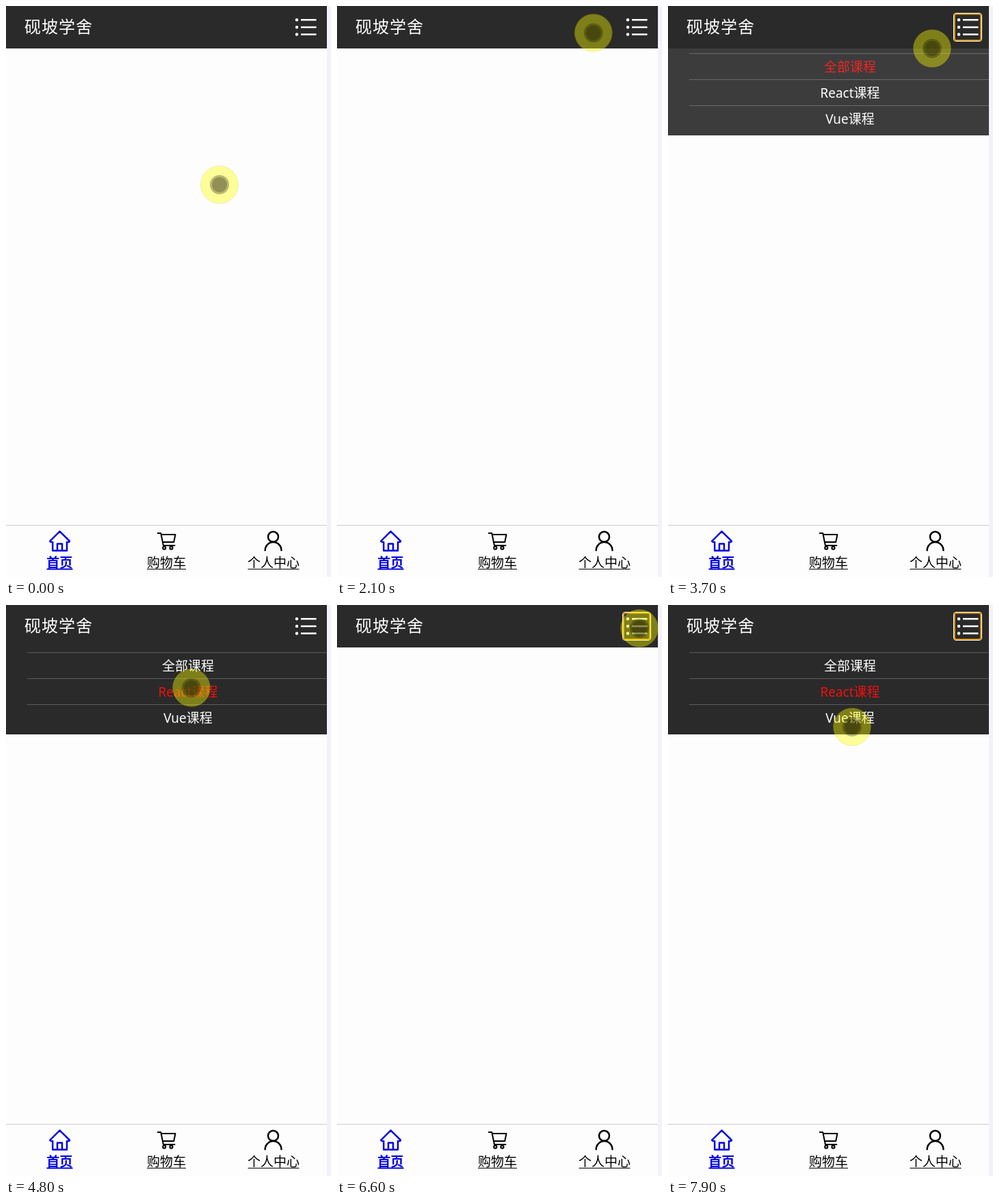
Write an HTML page that moves like this. It is 475x834 px and loops after 8000 ms.

```html
<!DOCTYPE html>
<html lang="zh-CN">
<head>
<meta charset="utf-8">
<title>课程菜单</title>
<style>
html, body { margin: 0; width: 100%; height: 100%; overflow: hidden; background: #fdfdfd; }
svg { display: block; width: 475px; height: 834px; }
text { font: 19px "Noto Sans", "Noto Sans CJK SC", "Noto Sans CJK", sans-serif; }
.mid { text-anchor: middle; }
.title { font-size: 24px; font-weight: 300; letter-spacing: 1px; fill: #fff; }
.line { fill: none; stroke-linejoin: round; stroke-linecap: round; }
.tab { stroke: #000; }
.home { font-weight: 700; fill: #0303df; }

.menu, .ring, .all, .react, .cursor, .dot, .arrow { animation: 8s step-end infinite; }
.menu { animation-name: fade; }
.ring { animation-name: focus; }
.all { animation-name: first; }
.react { animation-name: second; }
.cursor { animation-name: move; }
.dot { animation-name: touch; }
.arrow { animation-name: pointer; }

/* One step of 100 ms is 1.25% */
@keyframes fade {
  0% { opacity: 0 }
  38.75% { opacity: .06 }
  40% { opacity: .17 }
  41.25% { opacity: .4 }
  42.5% { opacity: .6 }
  43.75% { opacity: .74 }
  45% { opacity: .84 }
  46.25% { opacity: .91 }
  47.5% { opacity: .96 }
  48.75% { opacity: .98 }
  50% { opacity: 1 }
  62.5% { opacity: .89 }
  63.75% { opacity: .69 }
  65% { opacity: .47 }
  66.25% { opacity: .3 }
  67.5% { opacity: .19 }
  68.75% { opacity: .11 }
  70% { opacity: .06 }
  71.25% { opacity: .02 }
  72.5% { opacity: 0 }
  85% { opacity: .04 }
  86.25% { opacity: .19 }
  87.5% { opacity: .41 }
  88.75% { opacity: .61 }
  90% { opacity: .74 }
  91.25% { opacity: .84 }
  92.5% { opacity: .91 }
  93.75% { opacity: .96 }
  95% { opacity: .98 }
  97.5%, 100% { opacity: 1 }
}
@keyframes focus {
  0%, 57.5% { opacity: 0 }
  36.25%, 82.5%, 100% { opacity: 1 }
}
@keyframes first {
  0% { fill: #f01010 }
  58.75%, 100% { fill: #fff }
}
@keyframes second {
  0% { fill: #fff }
  58.75%, 100% { fill: #f01010 }
}
@keyframes touch {
  0%, 91.25%, 100% { opacity: 1 }
  87.5% { opacity: 0 }
}
@keyframes pointer {
  0%, 91.25%, 100% { opacity: 0 }
  87.5% { opacity: 1 }
}
@keyframes move {
  0% { transform: translate(312px, 261px) }
  3.75% { transform: translate(303px, 304px) }
  5% { transform: translate(303px, 304px); animation-timing-function: steps(2) }
  7.5% { transform: translate(271px, 294px) }
  8.75% { transform: translate(248px, 239px); animation-timing-function: steps(2) }
  11.25% { transform: translate(243px, 130px) }
  12.5% { transform: translate(252px, 85px) }
  13.75% { transform: translate(280px, 35px); animation-timing-function: steps(2) }
  16.25% { transform: translate(419px, 44px) }
  17.5% { transform: translate(440px, 40px); animation-timing-function: steps(4) }
  22.5% { transform: translate(191px, 46px); animation-timing-function: steps(4) }
  27.5% { transform: translate(436px, 37px) }
  28.75% { transform: translate(441px, 33px) }
  31.25% { transform: translate(441px, 33px); animation-timing-function: steps(4) }
  36.25% { transform: translate(443px, 31px); animation-timing-function: steps(3) }
  40% { transform: translate(443px, 33px) }
  42.5% { transform: translate(443px, 33px); animation-timing-function: steps(9) }
  53.75% { transform: translate(272px, 120px) }
  55% { transform: translate(271px, 121px) }
  70% { transform: translate(271px, 121px); animation-timing-function: steps(6) }
  77.5% { transform: translate(446px, 42px) }
  78.75% { transform: translate(446px, 42px); animation-timing-function: steps(3) }
  82.5% { transform: translate(442px, 34px) }
  86.25% { transform: translate(442px, 34px); animation-timing-function: steps(2) }
  88.75% { transform: translate(399px, 70px) }
  90% { transform: translate(381px, 92px); animation-timing-function: steps(7) }
  98.75%, 100% { transform: translate(269px, 178px) }
}
</style>
</head>
<body>
<svg viewBox="0 0 475 834">
  <rect width="475" height="834" fill="#fdfdfd"/>

  <g class="menu">
    <rect y="62" width="469" height="127" fill="#2a2a2a"/>
    <path d="M31 69.5H469M31 107.5H469M31 145.5H469" stroke="#5c5c5c"/>
    <g class="mid" fill="#fff">
      <text class="all" x="266" y="96">全部课程</text>
      <text class="react" x="266" y="134">React课程</text>
      <text x="266" y="172">Vue课程</text>
    </g>
  </g>

  <rect width="469" height="62" fill="#2a2a2a"/>
  <text class="title" x="27" y="39">砚坡学舍</text>
  <g class="ring" fill="none">
    <rect x="417.5" y="10.5" width="41" height="41" rx="3.5" stroke="#fff"/>
    <rect x="418.9" y="11.9" width="38.2" height="38.2" rx="2.5" stroke="#e59700" stroke-width="1.8"/>
  </g>
  <g fill="#fff">
    <circle cx="425" cy="20.3" r="2.2"/>
    <circle cx="425" cy="31" r="2.2"/>
    <circle cx="425" cy="41.5" r="2.2"/>
    <path d="M431 20.3H453.5M431 31H453.5M431 41.5H453.5" stroke="#fff" stroke-width="2.5"/>
  </g>

  <path d="M0 758.5H469" stroke="#ccc"/>
  <path class="line" stroke="#0303df" stroke-width="2.5"
    d="M78.5 767.3L64.2 781.6Q64.5 783.3 68.2 783V795.5H89V783Q92.8 783.3 93 781.6ZM75 795V785.5H82V795"/>
  <g class="line tab" stroke-width="2">
    <path d="M221.8 770H226.3L230 788H246.5M227 772H247.5L245.3 783H229.3"/>
    <circle cx="231.3" cy="791.5" r="2.1"/>
    <circle cx="241.5" cy="791.5" r="2.1"/>
  </g>
  <g class="line tab" stroke-width="2.5">
    <circle cx="390.5" cy="775.3" r="7.5"/>
    <path d="M378.7 795A11.9 11.9 0 0 1 402.5 795"/>
  </g>
  <g class="mid">
    <text class="home" x="78.3" y="820">首页</text>
    <text x="234.6" y="820">购物车</text>
    <text x="391" y="820">个人中心</text>
  </g>
  <path d="M59.5 822.5H97.5" stroke="#0303df" stroke-width="2"/>
  <path d="M206 822.5H263M353.5 822.5H428.5" stroke="#000"/>

  <rect x="469" width="6" height="834" fill="#f4f2f8"/>

  <g class="cursor">
    <circle r="27.5" fill="#ff0" fill-opacity=".4" stroke="#990" stroke-opacity=".15"/>
    <g class="dot">
      <circle r="14" fill-opacity=".27"/>
      <circle r="11" fill-opacity=".22"/>
    </g>
    <path class="arrow" transform="translate(-5.5 -8.5)" fill="#fff" stroke="#000"
      d="M0 0V16L3.7 12.5L6.4 18.5L8.8 17.4L6.3 11.6H11.4Z"/>
  </g>
</svg>
</body>
</html>
```
